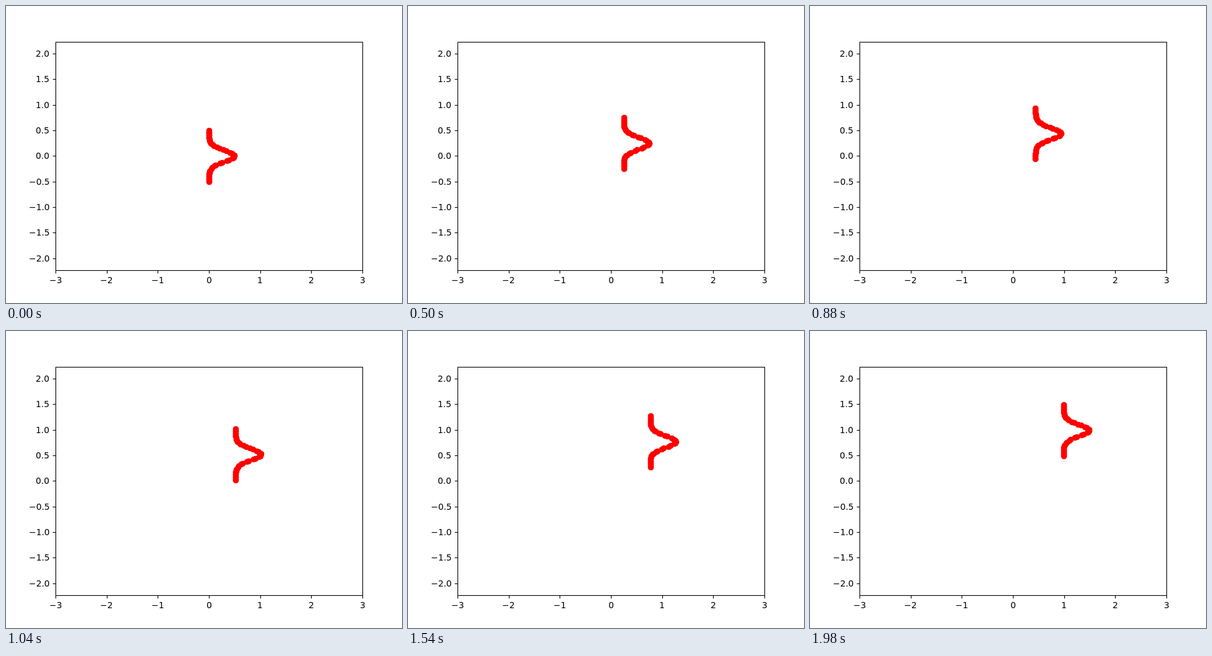
Write an HTML page with a canvas that moves like this. It is 640 by 480 pixels and loops after 2 s.

```html
<!DOCTYPE html>
<html>
<head>
<meta charset="utf-8">
<style>
  html, body { margin: 0; width: 100%; height: 100%; overflow: hidden; background: #fff; }
  canvas { display: block; }
</style>
</head>
<body>
<canvas id="stage" width="640" height="480"></canvas>
<script>
const ctx = document.getElementById('stage').getContext('2d');
const UNIT = 496 / 6, CX = 328, CY = 242.4;
const LEFT = 80, RIGHT = 576, TOP = 58, BOTTOM = 427;
const STEP_MS = 20, STEPS = 100;

const snap = v => Math.floor(v + 0.5) + 0.5;
const toX = x => CX + x * UNIT;
const toY = y => CY - y * UNIT;

// Slightly uneven samples along a Gaussian bump
const points = [];
for (let i = -20; i <= 20; i++) {
  let y = i * 0.025;
  if (i % 2) y -= 0.005;
  else if (i < 0 && i > -20) y += 0.006;
  points.push([0.5 * Math.exp(-40 * y * y), y]);
}

function line(x1, y1, x2, y2) {
  ctx.beginPath();
  ctx.moveTo(x1, y1);
  ctx.lineTo(x2, y2);
  ctx.stroke();
}

function label(text, x, y, align) {
  const width = ctx.measureText(text).width;
  ctx.fillText(text, Math.round(x - width * align), y);
}

function drawAxes() {
  ctx.strokeStyle = ctx.fillStyle = '#000';
  ctx.lineWidth = 1.11;
  ctx.font = '13.889px "DejaVu Sans", sans-serif';
  ctx.strokeRect(LEFT + 0.5, TOP + 0.5, RIGHT - LEFT, BOTTOM - TOP);
  for (let v = -3; v <= 3; v++) {
    const x = snap(toX(v));
    line(x, BOTTOM + 0.5, x, BOTTOM + 5.36);
    label(String(v).replace('-', '\u2212'), toX(v), 448, 0.5);
  }
  for (let v = -2; v <= 2; v += 0.5) {
    const y = snap(toY(v));
    line(LEFT - 4.36, y, LEFT + 0.5, y);
    label(v.toFixed(1).replace('-', '\u2212'), 70.3, Math.round(toY(v) + 5), 1);
  }
}

function drawPoints(shift) {
  ctx.fillStyle = '#f00';
  for (const [x, y] of points) {
    ctx.beginPath();
    ctx.arc(snap(toX(x + shift)), snap(toY(y + shift)), 4.86, 0, 2 * Math.PI);
    ctx.fill();
  }
}

const start = performance.now();
function frame() {
  const elapsed = performance.now() - start;
  const step = Math.floor(elapsed / STEP_MS) % STEPS;
  ctx.fillStyle = '#fff';
  ctx.fillRect(0, 0, 640, 480);
  drawPoints(step / 100);
  drawAxes();
  requestAnimationFrame(frame);
}
frame();
</script>
</body>
</html>
```
